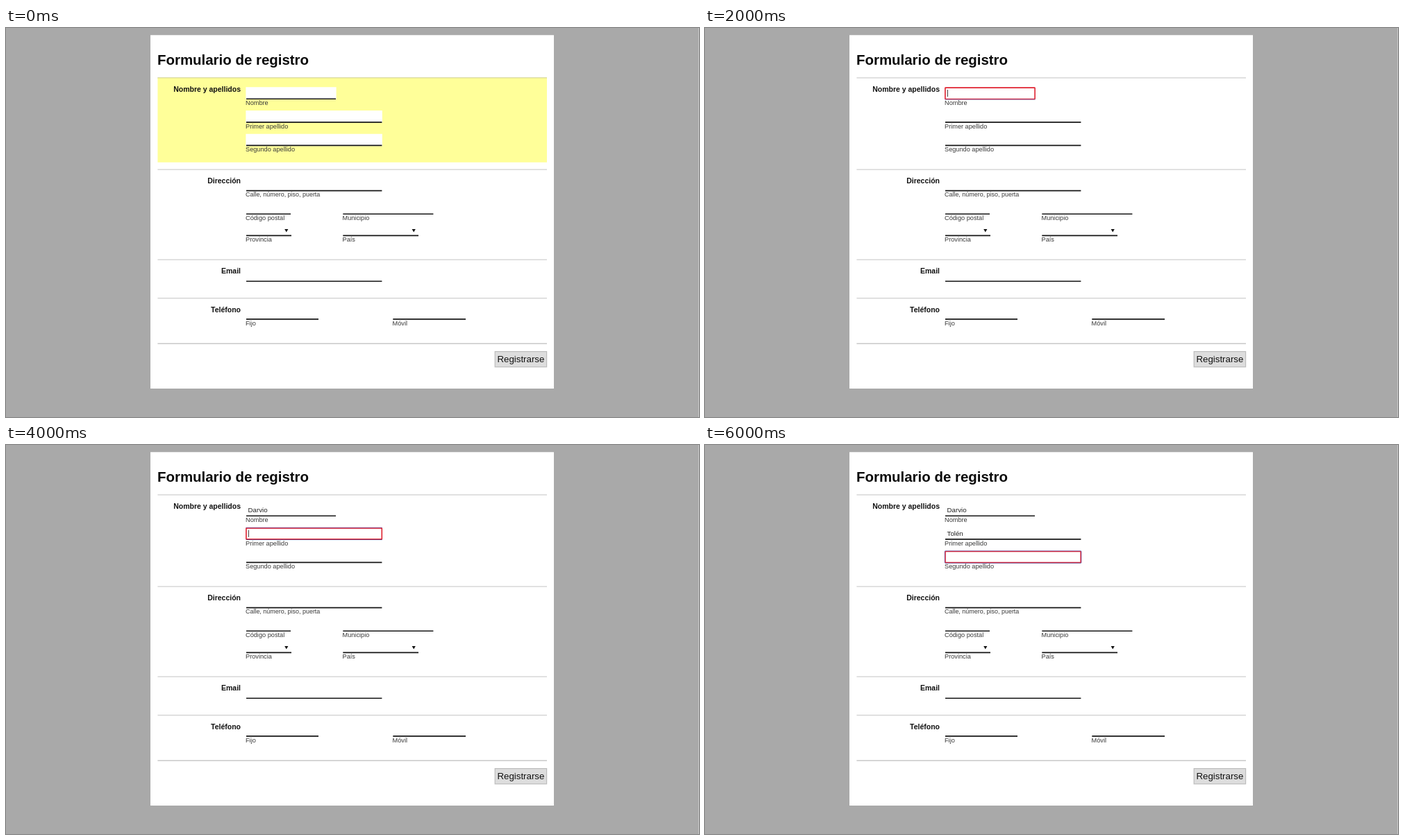
Recreate the animation shown at these times as an HTML page. Size 998 by 561 pixels, loop 7 s.

```html
<!DOCTYPE html>
<html lang="es">
<head>
<meta charset="utf-8">
<title>Formulario de registro</title>
<style>
  html, body { margin: 0; width: 100%; height: 100%; overflow: hidden; background: #a9a9a9; }
  svg { display: block; width: 998px; height: 561px; font-family: "Liberation Sans", Arial, sans-serif; }
  .title { font: bold 20.45px "Liberation Sans", Arial, sans-serif; fill: #0a0a0a; }
  .legend { font-weight: bold; font-size: 10.5px; text-anchor: end; fill: #111; }
  .hint { font-size: 9.2px; fill: #3a3a3a; }
  .value { font-size: 9.7px; fill: #222; }
  .picked rect { fill: #3390ff; }
  .picked text { fill: #fff; }
  .rules { stroke: #cfcfcf; stroke-width: 1.2; }
  .lines { stroke: #161616; stroke-width: 1.6; }
  .box { fill: #fff; stroke: #df2230; stroke-width: 1.6; }
  .glow { fill: none; stroke: #4a55b8; stroke-width: .6; }
  .caret { stroke: #222; stroke-width: .9; }

  /* --at: second at which the part appears; the class sets how long it stays */
  .for1, .for2, .for3 { animation: stay1 7s step-end calc((var(--at) - 7) * 1s) infinite; }
  .for2 { animation-name: stay2; }
  .for3 { animation-name: stay3; }
  @keyframes stay1 { 0% { visibility: visible } 14.2857%, 100% { visibility: hidden } }
  @keyframes stay2 { 0% { visibility: visible } 28.5714%, 100% { visibility: hidden } }
  @keyframes stay3 { 0% { visibility: visible } 42.8571%, 100% { visibility: hidden } }
</style>
</head>
<body>
<svg viewBox="0 0 998 561">
  <path fill="#a9a9a9" d="M0 0H998V561H0z"/>
  <path fill="#d4d4d4" d="M997.3 0H998V561H997.3z"/>
  <path fill="#fff" d="M208 10.3H789V520H208z"/>
  <text class="title" x="218" y="52.5">Formulario de registro</text>

  <path class="rules" d="M218.4 71.8H779M218.4 204.2H779M218.4 334.1H779M218.4 389.7H779"/>
  <path stroke="#bdbdbd" stroke-width="1.4" d="M218.4 455.1H779"/>

  <g class="for1" style="--at:0">
    <path fill="#ff9" d="M218.4 72H779V193.8H218.4z"/>
    <path stroke="#dede98" stroke-width="1.2" d="M218.4 71.8H779"/>
    <path fill="#fff" d="M345.4 85.3H475.6V103H345.4zM345.4 119H541.8V136.6H345.4zM345.4 152.7H541.8V170.2H345.4z"/>
  </g>

  <path class="lines" d="M346 102.3H475M346 135.9H541.4M346 169.4H541.4M346 234.6H541.4
    M346 268.2H410M485.3 268.2H615.4M346 299.4H411M485.3 299.4H594
    M346 365.3H541.4M346 419.9H450M557.3 419.9H662"/>
  <path fill="#111" d="M401.2 290H406.4L403.8 294.6zM584.6 290H589.8L587.2 294.6z"/>

  <g class="legend">
    <text x="338" y="92.2">Nombre y apellidos</text>
    <text x="338" y="224.4">Dirección</text>
    <text x="338" y="354.3">Email</text>
    <text x="338" y="410">Teléfono</text>
  </g>
  <g class="hint">
    <text x="345" y="111">Nombre</text>
    <text x="345" y="144.7">Primer apellido</text>
    <text x="345" y="178.2">Segundo apellido</text>
    <text x="345" y="243.3" font-size="8.95" style="font-size:8.95px">Calle, número, piso, puerta</text>
    <text x="345" y="276.9">Código postal</text>
    <text x="484.5" y="276.9">Municipio</text>
    <text x="345" y="308.3">Provincia</text>
    <text x="484.5" y="308.3">País</text>
    <text x="345" y="428.8">Fijo</text>
    <text x="556.6" y="428.8">Móvil</text>
  </g>

  <rect x="704.2" y="466.6" width="74.4" height="22.2" fill="#ddd" stroke="#bcbcbc" stroke-width="1.2"/>
  <text x="707.4" y="482.2" font-size="13.3" fill="#111">Registrarse</text>

  <g class="for2" style="--at:2">
    <rect class="box" x="345.9" y="86.1" width="129.2" height="16.4" rx=".6"/>
    <path class="glow" d="M345.4 103.1H475.6"/>
  </g>
  <path class="caret for1" style="--at:2" d="M349.4 89V99.2"/>
  <g class="value picked for1" style="--at:3">
    <rect x="348.6" y="88.6" width="28" height="11.2"/>
    <text x="348.6" y="97.3">Darvio</text>
  </g>
  <text class="value for3" style="--at:4" x="348.6" y="97.3">Darvio</text>

  <g class="for2" style="--at:4">
    <rect class="box" x="345.9" y="119.9" width="195.4" height="16" rx=".6"/>
    <path class="glow" d="M345.4 119.2H541.8M345.4 136.6H541.8"/>
  </g>
  <path class="caret for1" style="--at:4" d="M349.4 122.6V132.8"/>
  <g class="value picked for1" style="--at:5">
    <rect x="348.6" y="122.2" width="23.8" height="11.2"/>
    <text x="348.6" y="130.9">Tolén</text>
  </g>
  <text class="value for1" style="--at:6" x="348.6" y="130.9">Tolén</text>

  <g class="for1" style="--at:6">
    <rect class="box" x="346" y="153.5" width="195.2" height="16" rx=".6"/>
    <rect class="glow" x="345.2" y="152.7" width="196.8" height="17.6" rx=".8"/>
  </g>
</svg>
</body>
</html>
```
